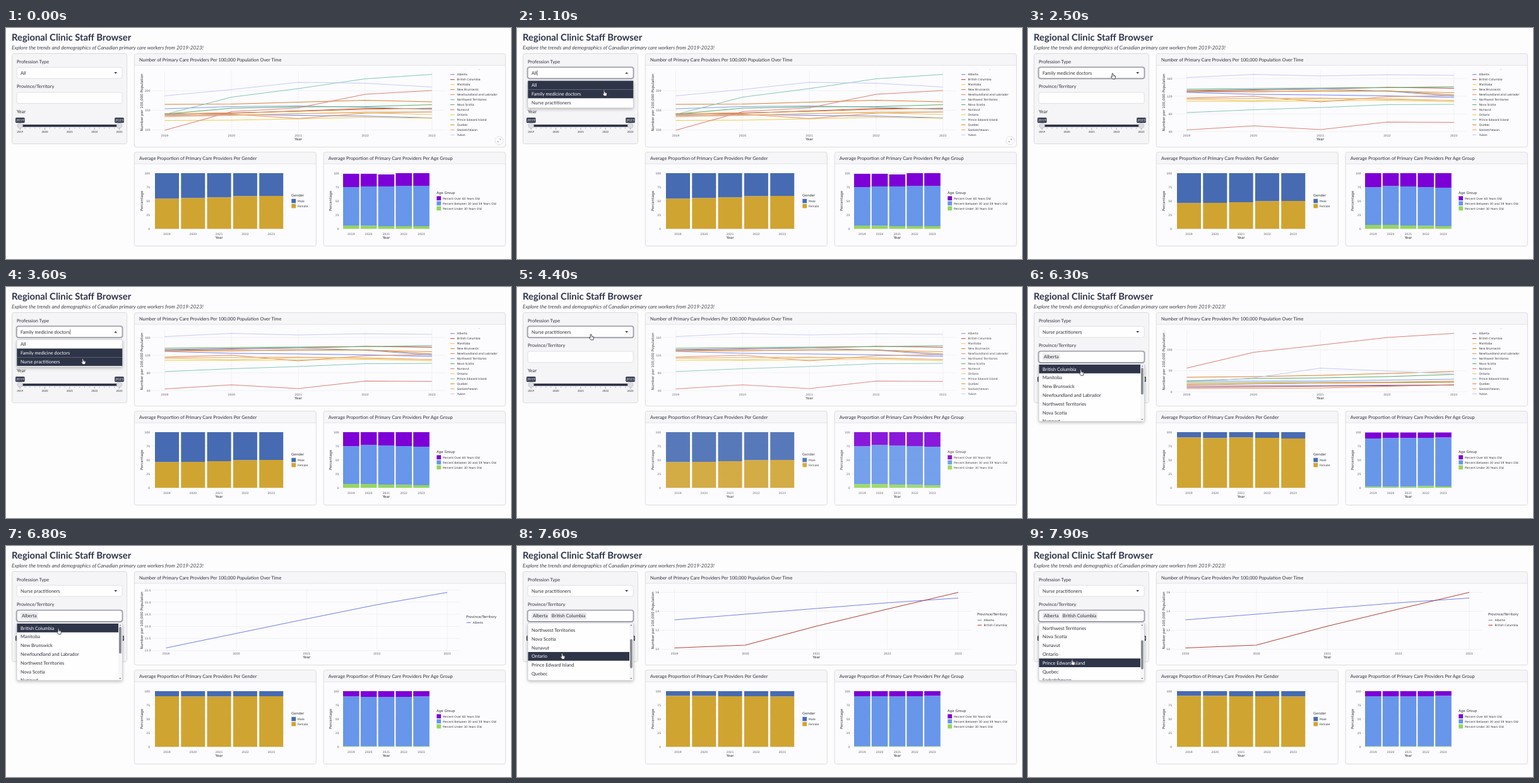
An HTML page with a canvas that plays this animation: 800x366 px, repeating every 8 s.

```html
<!DOCTYPE html>
<html lang="en">
<head>
<meta charset="utf-8">
<title>Regional Clinic Staff Browser</title>
<style>
html, body { margin: 0; width: 100%; height: 100%; overflow: hidden; background: #fdfdfe; }
canvas { display: block; width: 800px; height: 366px; }
</style>
</head>
<body>
<canvas id="stage"></canvas>
<script>
const LOOP = 8000, W = 800, H = 366;
const canvas = document.getElementById('stage');
const ctx = canvas.getContext('2d');
const ratio = window.devicePixelRatio || 1;
canvas.width = W * ratio;
canvas.height = H * ratio;

const UI = 'Lato, sans-serif', PLOT = '"DejaVu Sans", sans-serif';
const NAVY = '#2f3549', INK = '#2b2e38';
const YEARS = [2019, 2020, 2021, 2022, 2023];
const JOBS = ['All', 'Family medicine doctors', 'Nurse practitioners'];
const PLACES = [
  ['Alberta', '#7481ee'], ['British Columbia', '#b9463c'], ['Manitoba', '#f1c94d'],
  ['New Brunswick', '#d9802f'], ['Newfoundland and Labrador', '#e58e62'],
  ['Northwest Territories', '#7f9fe6'], ['Nova Scotia', '#5cae66'], ['Nunavut', '#e08079'],
  ['Ontario', '#e6c862'], ['Prince Edward Island', '#86c7b8'], ['Quebec', '#dd8d3a'],
  ['Saskatchewan', '#efa66c'], ['Yukon', '#c6c9fa']
];
const ROW = 13.8, LIST_TOP = 123;

// Height of each line, in the order of PLACES; short lists spread over the years.
const allLines = [
  [138, 137, 138.5, 139.5, 142.5], [136, 135, 131.5, 127.5, 127.5], [146.5, 146, 144, 141.5, 143],
  [121, 120.5, 117.5, 114.5, 117], [138.5, 136.5, 143.5, 135, 133], [128, 124.5, 123.5, 125.5, 129],
  [136.5, 127, 125, 124.5, 121.5], [162, 132.5, 126.5, 105, 99], [140, 138, 135.5, 134.5, 137],
  [137, 109.5, 96, 80.5, 73.5], [136, 134.5, 132, 129, 127], [140.5, 138.5, 136, 133, 133],
  [107.5, 97.5, 86, 87.5, 93.5]
];
const doctorLines = [
  [102, 105, 106, 107.5, 110], [100, 98.5, 96.5, 94, 95.5], [116, 116.5, 115.5, 114.5, 117],
  [101, 101, 99.5, 99.5, 106], [111, 108, 117, 109, 107], [99, 97.5, 96.5, 100, 108],
  [97, 96, 95, 94.5, 93], [161.5, 155, 161, 149, 149.5], [113, 115, 112, 112, 115],
  [134, 129.5, 126, 121.5, 121], [100, 101, 100, 100, 102.5], [112, 111, 115],
  [78.5, 73.5, 76, 74, 75]
];
const nurseLines = [
  [157, 155], [159, 155.5], [154, 150], [143, 142, 140, 137, 134], [161, 160, 155],
  [149, 149, 146], [149, 145, 144, 142, 138.5], [128.5, 103.5, 92, 80, 73.5], [152, 150],
  [151, 151, 150], [154, 151], [155.5, 149], [151, 144, 128.5, 133, 138]
];

// x: first and last year; y: [label, height] of the top tick, then step sizes.
const VIEWS = [
  { x: [251.5, 674.7], right: 228.5, y: [[200, 99.5], [150, 130.5], [100, 161.5]], lines: allLines,
    female: [270.5, 269.5, 268.5, 266.5, 266], top: [231, 231, 232, 230, 230],
    mid: [252, 251, 251, 250, 250], young: [313, 313.5, 314, 314, 314] },
  { x: [251.5, 674.7], right: 228.5, y: [[160, 80], [120, 108], [80, 136], [40, 164]], lines: doctorLines,
    female: [277.5, 277, 276, 274.5, 274], top: [230],
    mid: [252.5, 250.5, 251, 252, 253], young: [312, 312, 313, 313.5, 314] },
  { x: [251.5, 674.7], right: 228.5, y: [[100, 99.5], [50, 132.7], [0, 166]], lines: nurseLines,
    female: [238.5, 239.5, 238.5, 239, 240], top: [230.5],
    mid: [240, 239.5, 239.5, 239, 238.5], young: [316.5, 316.5, 316.5, 315.5, 316] },
  { x: [253.5, 699], right: 229.5,
    y: [['15.5', 70], ['15.0', 89], ['14.5', 108.2], ['14.0', 127.4], ['13.5', 146.6], ['13.0', 165.7]],
    lines: [[161.5, 138.5, 115.5, 93, 73.5]], title: 114,
    female: [238, 238.5, 238.5, 238, 238], top: [230],
    mid: [238.5, 239, 239, 239, 238.5], young: [317.5] },
  { x: [249.5, 699], right: 225, y: [[16, 73.5], [14, 103.5], [12, 133.5], [10, 163.5]],
    lines: [[117, 108, 99, 90, 82.5], [161.5, 157, 127, 100, 73.5]], title: 110,
    female: [237.5, 237.5, 238, 238, 238.5], top: [230],
    mid: [238, 238, 238.5, 238, 237.5], young: [317.5] }
];

// Moments of the interaction, ms.
const OPEN_JOB = [[750, 1250], [2850, 3850]];
const JOB_AT = [1250, 3850], OPEN_PLACE = 4980, PICK_AT = [6000, 6950];
const UPDATE_AT = [1900, 4600, 6500, 7500], DIM_AT = [1700, 4330, 6280, 7240];
const POINTER = [
  [400, 190, 82], [750, 140, 72], [950, 138, 98], [1100, 138, 98.5], [1250, 138, 101],
  [1900, 136, 74], [2500, 134, 71.5], [2900, 134, 71.5], [3450, 122, 113], [3850, 121, 114],
  [4150, 117, 74.5], [4600, 117, 74.5], [4950, 85, 109], [5300, 85, 130], [5500, 85, 134.5],
  [6000, 84, 131], [6800, 83, 130.5], [6980, 83, 130.5], [7300, 74, 152], [7800, 70, 179.5], [8000, 70, 179.5]
];

const passed = (times, t) => times.filter(at => t >= at).length;
const clamp = v => Math.max(0, Math.min(1, v));
const ease = v => { v = clamp(v); return v * v * (3 - 2 * v); };
const pick = (list, i) => list[Math.min(i, list.length - 1)];

function text(str, x, y, size, opt = {}) {
  ctx.font = `${opt.style || ''} ${size}px ${opt.font || UI}`;
  ctx.textAlign = opt.align || 'left';
  ctx.fillStyle = opt.color || INK;
  ctx.fillText(str, x, y);
}
const plotText = (str, x, y, size = 4.5, align = 'left', color = '#33353c') =>
  text(str, x, y, size, { font: PLOT, align, color });

function rect(x, y, w, h, fill) {
  ctx.fillStyle = fill;
  ctx.fillRect(x, y, w, h);
}
function box(x, y, w, h, r, fill, stroke, lw = 1) {
  ctx.beginPath();
  ctx.roundRect(x, y, w, h, r);
  if (fill) { ctx.fillStyle = fill; ctx.fill(); }
  if (stroke) { ctx.strokeStyle = stroke; ctx.lineWidth = lw; ctx.stroke(); }
}
function poly(points, color, lw, fill) {
  ctx.beginPath();
  points.forEach(([x, y]) => ctx.lineTo(x, y));
  ctx.lineWidth = lw;
  ctx.lineJoin = 'round';
  if (fill) { ctx.closePath(); ctx.fillStyle = fill; ctx.fill(); }
  if (color) { ctx.strokeStyle = color; ctx.stroke(); }
}
const line = (x1, y1, x2, y2, color, lw) => poly([[x1, y1], [x2, y2]], color, lw);
function triangle(x, y, w, h, color) {
  poly([[x - w, y - h], [x + w, y - h], [x, y + h]], null, 0, color);
}
function upright(str, x, y) {
  ctx.save();
  ctx.translate(x, y);
  ctx.rotate(-Math.PI / 2);
  plotText(str, 0, 0, 5.7, 'center');
  ctx.restore();
}

function card(x, y, w, h, title) {
  box(x, y, w, h, 3, '#fcfcfe');
  box(x, y, w, 18.5, [3, 3, 0, 0], '#f6f6f8');
  line(x, y + 18.5, x + w, y + 18.5, '#dedfe3', 0.8);
  box(x, y, w, h, 3, null, '#d8d9dd', 0.9);
  text(title, x + 7.7, y + 11.8, 7.4);
}

function lineChart(view) {
  const [x0, x1] = view.x, step = (x1 - x0) / 4, end = x1 + step * 0.05;
  view.y.forEach(([label, y]) => {
    line(x0 - step * 0.2, y, end + 15, y, '#ededf1', 0.7);
    plotText(label, view.right, y + 1.6, 4.5, 'right', '#5a5c63');
  });
  YEARS.forEach((year, i) => {
    const x = x0 + i * step;
    line(x, 68, x, 165.5, '#ededf1', 0.7);
    plotText(year, x, 172, 4.5, 'center', '#5a5c63');
  });
  plotText('Year', (x0 + x1) / 2, 178, 5.7, 'center');
  upright('Number per 100,000 Population', 216.5, 118);
  view.lines.forEach((ys, i) => {
    const gap = (x1 - x0) / (ys.length - 1);
    poly(ys.map((y, k) => [x0 + k * gap, y]), PLACES[i][1], 1.15);
  });

  const few = view.title !== undefined;
  const lx = few ? 729.5 : 704, ly = few ? view.title + 7.5 : 73.7, gap = few ? 3.5 : 4;
  ctx.save();
  ctx.beginPath();
  ctx.rect(690, 65.6, 102, 120);
  ctx.clip();
  plotText('Province/Territory', lx - 0.5, few ? view.title : 65.3, 5.5);
  ctx.restore();
  view.lines.forEach((_, i) => {
    const y = ly + i * 7.97;
    line(lx, y, lx + 6.5, y, PLACES[i][1], 1.1);
    plotText(PLACES[i][0], lx + 6.5 + gap, y + 1.6);
  });
}

function barChart(left, x0, pitch, width, legendX, legendY, title, keys, cut) {
  const mid = x0 + pitch * 2 + width / 2;
  for (let p = 0; p <= 100; p += 25) {
    const y = 318 - p * 0.88;
    line(x0 - 4, y, x0 + pitch * 5, y, '#ededf1', 0.7);
    plotText(p, left + 17, y + 1.6, 4.5, 'right', '#5a5c63');
  }
  YEARS.forEach((year, i) => {
    const x = x0 + i * pitch;
    keys.forEach(([, color], k) => {
      const y = pick(cut[k], i), bottom = k + 1 < keys.length ? pick(cut[k + 1], i) : 318.2;
      rect(x, y, width, bottom - y, color);
    });
    plotText(year, x + width / 2, 327.8, 4.5, 'center', '#5a5c63');
  });
  plotText('Year', mid, 333.5, 5.7, 'center');
  upright('Percentage', left + 5.5, 274);
  plotText(title, legendX, legendY, 5.5);
  keys.forEach(([label, color], i) => {
    const y = legendY + 3.8 + i * 8;
    rect(legendX + 0.3, y, 6.8, 6.6, color);
    plotText(label, legendX + 10, y + 5);
  });
}

function charts(t) {
  const n = passed(UPDATE_AT, t), view = VIEWS[n];
  const dim = n < DIM_AT.length ? ease((t - DIM_AT[n]) / 250) : 0;
  ctx.save();
  ctx.globalAlpha = 1 - 0.5 * dim;
  lineChart(view);
  barChart(211, 236, 41.3, 38, 452, 267, 'Gender',
    [['Male', '#466bb2'], ['Female', '#d0a431']], [[230], view.female]);
  barChart(510.5, 534, 27.8, 25.6, 682, 262.7, 'Age Group',
    [['Percent Over 60 Years Old', '#7d00d6'], ['Percent Between 30 and 59 Years Old', '#6796ea'],
      ['Percent Under 30 Years Old', '#96d562']], [view.top, view.mid, view.young]);
  ctx.restore();
  if (t < 1850) {
    ctx.beginPath();
    ctx.arc(781.2, 178.3, 6.6, 0, Math.PI * 2);
    ctx.fillStyle = '#fff';
    ctx.fill();
    ctx.strokeStyle = '#d6d7dc';
    ctx.lineWidth = 0.8;
    ctx.stroke();
    poly([[781.7, 176], [783.4, 176], [783.4, 177.8]], '#777a82', 0.7);
    poly([[779, 178.8], [779, 180.6], [780.8, 180.6]], '#777a82', 0.7);
  }
}

function field(y, focus) {
  if (focus) box(16.8, y, 167.6, 17.6, 3, null, '#c9cbd1', 3);
  box(17, y, 167.2, 17.6, 3, '#fefefe', focus ? '#8b8e97' : '#dadbe0', focus ? 1.1 : 0.8);
}

function slider() {
  const x0 = 22.3, x1 = 179.5, gap = (x1 - x0) / 4;
  text('Year', 17, 134.6, 7.4);
  for (let i = 0; i <= 20; i++) {
    const x = x0 + i * gap / 5;
    line(x, 158, x, i % 5 ? 159.4 : 161, '#4a4e5c', 0.5);
  }
  box(x0, 152.9, x1 - x0, 3.8, 1.5, NAVY);
  YEARS.forEach((year, i) => text(year, x0 + i * gap, 166, 4.3, { align: 'center' }));
  [[x0, 2019], [x1, 2023]].forEach(([x, year]) => {
    box(x - 7.3, 142, 14.6, 8.2, 1.5, NAVY);
    triangle(x, 151, 1.5, 1, NAVY);
    text(year, x, 148.3, 5.7, { align: 'center', color: '#fff' });
    ctx.beginPath();
    ctx.arc(x, 154.7, 4.3, 0, Math.PI * 2);
    ctx.fillStyle = '#dddee2';
    ctx.fill();
    ctx.strokeStyle = '#b3b5bb';
    ctx.lineWidth = 0.7;
    ctx.stroke();
  });
}

function panel(y, h) {
  ctx.save();
  ctx.shadowColor = 'rgba(0,0,0,.25)';
  ctx.shadowBlur = 5 * ratio;
  ctx.shadowOffsetY = 2 * ratio;
  box(17, y, 167.5, h, 2, '#fefefe');
  ctx.restore();
  box(17, y, 167.5, h, 2, null, '#c6c8ce', 0.8);
}
function row(label, y, w, dark) {
  if (dark) rect(17.3, y, w, ROW, NAVY);
  text(label, 23, y + 9.5, 7.4, { color: dark ? '#fff' : INK });
}

function sidebar(t, tip) {
  const job = passed(JOB_AT, t), picked = passed(PICK_AT, t);
  const jobOpen = OPEN_JOB.some(([a, b]) => t >= a && t < b), placeOpen = t >= OPEN_PLACE;
  box(9.5, 40.5, 182, 143, 3, '#f5f5f7', '#d6d7db', 0.9);

  text('Profession Type', 17, 55.6, 7.4);
  field(62.3, t >= OPEN_JOB[0][0] && !placeOpen);
  text(JOBS[job], 23, 73.6, 7.4);
  if (jobOpen) {
    const x = 23.7 + ctx.measureText(JOBS[job]).width;
    line(x, 67, x, 75.5, INK, 0.6);
  }
  triangle(173.7, 71.2, 2.4, jobOpen ? -1.3 : 1.3, INK);

  text('Province/Territory', 17, 95.3, 7.4);
  field(102, placeOpen);
  let x = 23;
  for (let i = 0; i < picked; i++) {
    const name = PLACES[i][0];
    ctx.font = `7.4px ${UI}`;
    const w = ctx.measureText(name).width + 4;
    box(x, 105.3, w, 11.2, 1.5, '#ebebee');
    text(name, x + 2, 113.3, 7.4);
    x += w + 2;
  }
  if (placeOpen && !picked) line(21, 106, 21, 115.5, INK, 0.7);
  slider();

  if (jobOpen) {
    panel(83.3, 43.5);
    const hover = Math.floor((tip[1] - 83.7) / ROW);
    JOBS.forEach((name, i) => row(name, 83.7 + i * ROW, 166.9, i === job || i === hover));
  }
  if (placeOpen) placeList(t, picked, tip);
}

function placeList(t, picked, tip) {
  const items = PLACES.slice(picked), scroll = 3 * ROW * ease((t - 7150) / 550);
  const hover = Math.max(0, Math.floor((tip[1] - LIST_TOP + scroll) / ROW));
  panel(122, 91);
  ctx.save();
  ctx.beginPath();
  ctx.rect(17.3, 122.4, 166.8, 90.2);
  ctx.clip();
  items.forEach(([name], i) => row(name, LIST_TOP + i * ROW - scroll, 160.7, i === hover));
  rect(178, 122, 6.3, 91, '#f7f7f8');
  const full = items.length * ROW, track = 78;
  box(179, 128 + scroll / full * track, 3.8, 90 / full * track, 1.9, '#898b91');
  triangle(180.9, 125.2, 1.7, -1, '#7b7d83');
  triangle(180.9, 210, 1.7, 1, '#7b7d83');
  ctx.restore();
}

function pointerAt(t) {
  const i = POINTER.findIndex(k => k[0] > t);
  if (i < 1) return POINTER[0].slice(1);
  const a = POINTER[i - 1], b = POINTER[i], p = ease((t - a[0]) / (b[0] - a[0]));
  return [a[1] + (b[1] - a[1]) * p, a[2] + (b[2] - a[2]) * p];
}
function hand([x, y]) {
  ctx.save();
  ctx.translate(x, y);
  ctx.beginPath();
  ctx.moveTo(-0.8, 6);
  ctx.lineTo(-0.8, 0.8);
  ctx.quadraticCurveTo(0, -0.6, 0.9, 0.8);
  ctx.lineTo(0.9, 3.3);
  ctx.lineTo(3.8, 4);
  ctx.quadraticCurveTo(4.7, 4.3, 4.6, 5.5);
  ctx.lineTo(3.8, 9.3);
  ctx.lineTo(0, 9.3);
  ctx.lineTo(-2.7, 5.8);
  ctx.quadraticCurveTo(-2.4, 4.4, -0.8, 6);
  ctx.closePath();
  ctx.fillStyle = '#fff';
  ctx.fill();
  ctx.strokeStyle = '#22242b';
  ctx.lineWidth = 0.8;
  ctx.lineJoin = 'round';
  ctx.stroke();
  [1.7, 3].forEach(dx => line(dx, 4.2, dx, 5.8, '#22242b', 0.5));
  ctx.restore();
}

function draw(now) {
  const t = now % LOOP, tip = pointerAt(t);
  ctx.setTransform(ratio, 0, 0, ratio, 0, 0);
  ctx.textRendering = 'geometricPrecision';
  rect(0, 0, W, H, '#fdfdfe');
  text('Regional Clinic Staff Browser', 9, 20, 14.8, { style: 'bold', color: NAVY });
  text('Explore the trends and demographics of Canadian primary care workers from 2019-2023!',
    9, 34.3, 8.2, { style: 'italic', color: '#3f424c' });
  card(203.3, 40.7, 588, 148, 'Number of Primary Care Providers Per 100,000 Population Over Time');
  card(203.3, 196.7, 288, 148.8, 'Average Proportion of Primary Care Providers Per Gender');
  card(503.1, 196.7, 288.2, 148.8, 'Average Proportion of Primary Care Providers Per Age Group');
  charts(t);
  sidebar(t, tip);
  if (t >= POINTER[0][0]) hand(tip);
  requestAnimationFrame(draw);
}
requestAnimationFrame(draw);
</script>
</body>
</html>
```
